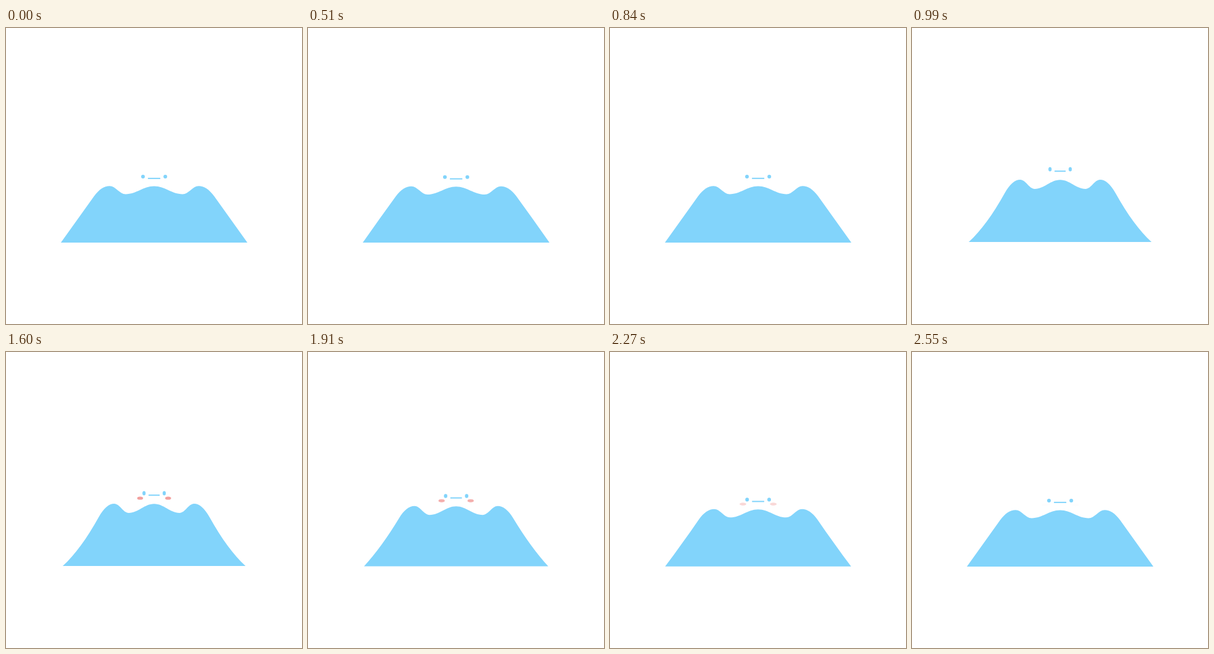
An HTML page that plays this animation: 480x480 px, repeating every 3.13 s.

```html
<!DOCTYPE html>
<html lang="en">
<head>
<meta charset="utf-8">
<title>Squash and stretch</title>
<style>
  html, body { margin: 0; width: 100%; height: 100%; overflow: hidden; background: #fff; }
  svg { display: block; width: 100%; height: 100%; }
</style>
</head>
<body>
<svg viewBox="0 0 480 480">
  <g fill="#82d4fb">
    <path id="hill"/>
    <ellipse class="eye"/>
    <ellipse class="eye"/>
  </g>
  <path id="mouth" stroke="#82d4fb" stroke-width="2"/>
  <g id="cheeks" fill="#f2a09e">
    <ellipse class="cheek"/>
    <ellipse class="cheek"/>
  </g>
</svg>
<script>
const LOOP = 3130, STEP = 30;
const AXIS = 240.2;
const SQUASH = -0.74;

const $ = id => document.getElementById(id);
const eyes = document.querySelectorAll('.eye');
const cheeks = document.querySelectorAll('.cheek');

const sineOut = u => Math.sin(Math.PI * u / 2);
const soft = u => (u + (1 - Math.cos(Math.PI * u)) / 2) / 2;
const lerp = (a, b, k) => a + (b - a) * k;

// progress between two times, held for whole steps
function span(t, from, to) {
  const held = Math.floor((t - from) / STEP) * STEP;
  return Math.min(1, Math.max(0, held / (to - from)));
}

// 0 at rest, negative when squashed, 1 when fully stretched
function liftAt(t) {
  if (t < 720) return SQUASH * soft(span(t, 480, 720));
  if (t < 1700) return lerp(SQUASH, 1, soft(span(t, 720, 990)));
  return 1 - sineOut(span(t, 1700, 2550));
}

function blushAt(t) {
  if (t < 1700) return span(t, 1090, 1600);
  return 1 - span(t, 1700, 2550) ** 1.3;
}

// handles that make a wave between two level points
function wave(a, b) {
  const reach = (b[0] - a[0]) * 0.38;
  return [[a[0] + reach, a[1]], [b[0] - reach, b[1]], b];
}

// cubic form of a curve with a single handle
function bend(a, h, b) {
  const toward = p => p.map((v, i) => lerp(v, h[i], 2 / 3));
  return [toward(a), toward(b), b];
}

function hillPath(lift) {
  const base = [89 + 3 * lift, 348 - lift];
  const shoulder = [143 + 7.5 * lift, 272.5 - 5 * lift];
  const peak = [168 + 7.5 * lift, 256.2 - 10.3 * lift];
  const trough = [194 + 5 * lift, 269.5 - 8.6 * lift];
  const middle = [AXIS, 256.6 - 10.3 * lift];
  const flank = [(base[0] + shoulder[0]) / 2, (base[1] + shoulder[1]) / 2 + 13 * lift];
  const brow = [peak[0] - 13, peak[1]];

  const left = [
    base, ...bend(base, flank, shoulder), ...bend(shoulder, brow, peak),
    ...wave(peak, trough), ...wave(trough, middle)
  ];
  const right = left.slice(0, -1).reverse().map(([x, y]) => [2 * AXIS - x, y]);
  const [start, ...curve] = [...left, ...right];
  return `M${start}C${curve.join(' ')}Z`;
}

function placePair(pair, gap, cy, rx, ry) {
  pair.forEach((el, i) => {
    const cx = AXIS + (i ? gap : -gap);
    for (const [name, value] of Object.entries({ cx, cy, rx, ry })) el.setAttribute(name, value);
  });
}

function draw(t) {
  const lift = liftAt(t);
  const mouthHalf = 10 - lift, mouthY = 243.9 - 11.7 * lift;
  $('hill').setAttribute('d', hillPath(lift));
  $('mouth').setAttribute('d', `M${AXIS - mouthHalf} ${mouthY}h${2 * mouthHalf}`);
  placePair(eyes, 18.1 - 1.7 * lift, 241 - 12 * lift, 3 - 0.4 * lift, 3 + 0.5 * lift);
  placePair(cheeks, 24.9 - 2.2 * lift, 248 - 11 * lift, 5.5 - 0.7 * lift, 2.3 + 0.3 * lift);
  $('cheeks').setAttribute('opacity', blushAt(t));
}

const begin = performance.now();
function tick() {
  draw((performance.now() - begin) % LOOP);
  requestAnimationFrame(tick);
}
tick();
</script>
</body>
</html>
```
